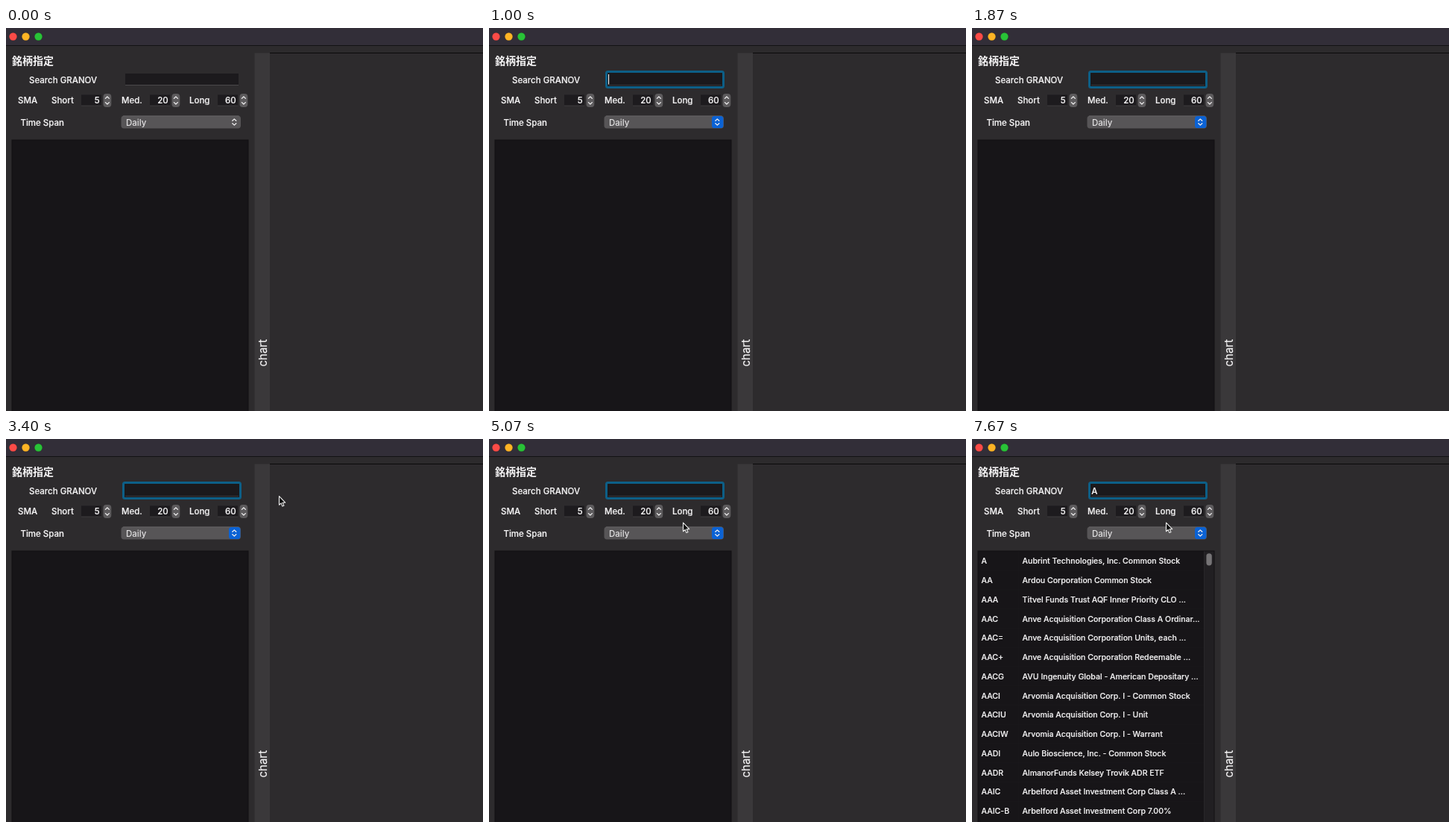
Animation of 640x513 px, one loop 8000 ms. Source, as an HTML page:

```html
<!DOCTYPE html>
<html lang="ja">
<head>
<meta charset="utf-8">
<title>Stock chart</title>
<style>
html, body { margin: 0; width: 100%; height: 100%; overflow: hidden; background: #2d2b2d; }
svg { display: block; width: 100vw; height: 100vh; }
text { font: 500 11.5px Inter, "Open Sans", sans-serif; fill: #f4f3f4; stroke: #f4f3f4; stroke-width: 0.2; white-space: pre; }
.head { font: 700 14px "Noto Sans CJK JP", "Noto Sans CJK", sans-serif; stroke: none; }
.row { font-size: 10.55px; }
.end { text-anchor: end; }
.side { font-size: 15px; font-weight: 400; }
.soft { fill: #e2e1e2; stroke: none; }
.chev { fill: none; stroke: #efeeef; stroke-width: 1.3; stroke-linecap: round; stroke-linejoin: round; }
</style>
</head>
<body>
<svg id="stage" viewBox="0 0 640 513" preserveAspectRatio="none"></svg>
<script>
const NS = 'http://www.w3.org/2000/svg';
const stage = document.getElementById('stage');

function add(tag, attrs, parent = stage) {
  const node = document.createElementNS(NS, tag);
  for (const key in attrs) node.setAttribute(key, attrs[key]);
  return parent.appendChild(node);
}
const rect = (x, y, width, height, fill, parent, extra) =>
  add('rect', { x, y, width, height, fill, ...extra }, parent);
function label(x, y, str, cls = '', parent) {
  const node = add('text', { x, y, class: cls }, parent);
  node.textContent = str;
  return node;
}
const show = (node, on) => node.setAttribute('visibility', on ? 'visible' : 'hidden');

function chevrons(x, y, gap, parent) {
  add('path', {
    class: 'chev',
    d: `M${x - 2.5} ${y - gap}l2.5 -2.4l2.5 2.4M${x - 2.5} ${y + gap}l2.5 2.4l2.5 -2.4`
  }, parent);
}

// Window frame
rect(0, 0, 640, 513, '#2d2b2d');
rect(0, 0, 640, 23, '#322e38');
rect(0, 23, 640, 1, '#131214');
['#fb4b47', '#fdb425', '#29c237'].forEach((fill, i) =>
  add('circle', { cx: 9.5 + 17 * i, cy: 11.5, r: 5.2, fill, stroke: '#000', 'stroke-opacity': 0.15, 'stroke-width': 0.8 }));

// Chart pane
rect(333.5, 33.5, 20.5, 480, '#3a383a');
rect(354, 33, 286, 1, '#0a090a');
const side = label(0, 0, 'chart', 'side');
side.setAttribute('transform', 'translate(349.5 453.5) rotate(-90)');

// Search field
label(8, 48.5, '銘柄指定', 'head');
label(31, 73.5, 'Search GRANOV');
const idle = add('g', {});
rect(160, 61, 152, 16, '#1c1a1d', idle);
rect(160, 76, 152, 1, '#4a484a', idle);
const focus = add('g', {});
rect(157.5, 58.5, 157, 21, '#1b191c', focus, { rx: 2, stroke: '#0d5f87', 'stroke-width': 3 });
rect(160, 76, 152, 1, '#39373a', focus);
const typed = label(160.3, 73.5, 'A');
const caret = rect(160, 62, 1.1, 13.5, '#f4f4f4');

// Moving averages
label(16, 101.3, 'SMA');
[['Short', 61, '5', 101], ['Med.', 155, '20', 193], ['Long', 246, '60', 284]].forEach(([name, x, value, box]) => {
  label(x, 101.3, name);
  rect(box, 89.5, 27, 15, '#1d1b1e');
  rect(box, 103.7, 27, 0.8, '#4a484a');
  label(box + 24.7, 101.3, value, 'end');
  rect(box + 29.5, 88, 10.8, 18, '#5d5b5d', stage, { rx: 4 });
  chevrons(box + 34.9, 97, 2.6);
});

// Time span
label(19.4, 130.8, 'Time Span');
rect(154.5, 117.6, 160.5, 17, '#575557', stage, { rx: 4 });
rect(157, 117.6, 155.5, 0.8, '#6a686a');
label(161, 131, 'Daily', 'soft');
const blue = rect(299, 118, 15.4, 16, '#0b62d4', stage, { rx: 3.6 });
chevrons(306.3, 126, 1.7);

// Result list
rect(8, 150, 317, 370, '#171518', stage, { stroke: '#121113', 'stroke-width': 1 });
const list = add('g', {});
const ROW = 25.77;
[
  ['A', 'Aubrint Technologies, Inc. Common Stock'],
  ['AA', 'Ardou Corporation Common Stock'],
  ['AAA', 'Titvel Funds Trust AQF Inner Priority CLO ...'],
  ['AAC', 'Anve Acquisition Corporation Class A Ordinar...'],
  ['AAC=', 'Anve Acquisition Corporation Units, each ...'],
  ['AAC+', 'Anve Acquisition Corporation Redeemable ...'],
  ['AACG', 'AVU Ingenuity Global - American Depositary ...'],
  ['AACI', 'Arvomia Acquisition Corp. I - Common Stock'],
  ['AACIU', 'Arvomia Acquisition Corp. I - Unit'],
  ['AACIW', 'Arvomia Acquisition Corp. I - Warrant'],
  ['AADI', 'Aulo Bioscience, Inc. - Common Stock'],
  ['AADR', 'AlmanorFunds Kelsey Trovik ADR ETF'],
  ['AAIC', 'Arbelford Asset Investment Corp Class A ...'],
  ['AAIC-B', 'Arbelford Asset Investment Corp 7.00%']
].forEach(([code, name], i) => {
  const mid = 163.2 + ROW * i;
  label(12.6, mid + 4, code, 'row', list);
  label(67.6, mid + 4, name, 'row', list);
  rect(12, mid + ROW / 2 - 0.4, 299, 0.8, '#1a181b', list);
});
rect(62, 151, 0.8, 362, '#1a181b', list);
rect(311, 150.5, 13.5, 363, '#211f22', list);
rect(311, 150.5, 0.8, 363, '#2c2a2d', list);
rect(314.4, 153.3, 7.4, 16.2, '#767476', list, { rx: 3.7 });

const pointer = add('path', {
  d: 'M0 0V11.6L2.6 9.2L4.4 13.4L6.4 12.6L4.6 8.5H8.2Z',
  fill: '#0b0b0b', stroke: '#f2f2f2', 'stroke-width': 1.1, 'stroke-linejoin': 'round'
});

// Pointer visits: visible from start to stop, gliding in a few screen refreshes
const visits = [
  { start: 1070, stop: 1870, from: [486, 45.2], to: [412, 135.2] },
  { start: 3400, stop: 3470, from: [366.5, 76.7], to: [366.5, 76.7] },
  { start: 3930, stop: 8000, from: [278.8, 7.2], to: [260.5, 112.2] }
];
const LOOP = 8000, TICK = 66.6, GLIDE = 3;
const within = (t, a, b) => t >= a && t < b;
const ease = p => 1 - (1 - p) ** 2;

function render(t) {
  const focused = t >= 70, found = t >= 7130;
  show(idle, !focused);
  show(focus, focused);
  show(blue, focused);
  show(typed, found);
  show(list, found);
  show(caret, within(t, 70, 470) || within(t, 1000, 1530) || within(t, 7130, 7670));
  caret.setAttribute('x', found ? 168.4 : 160);

  const visit = visits.find(v => within(t, v.start, v.stop));
  show(pointer, !!visit);
  if (visit) {
    const step = Math.min(GLIDE, Math.floor((t - visit.start) / TICK));
    const p = ease(step / GLIDE);
    const [x, y] = visit.from.map((a, i) => a + (visit.to[i] - a) * p);
    pointer.setAttribute('transform', `translate(${x} ${y})`);
  }
}

const began = performance.now();
function frame() {
  render((performance.now() - began) % LOOP);
  requestAnimationFrame(frame);
}
frame();
</script>
</body>
</html>
```
